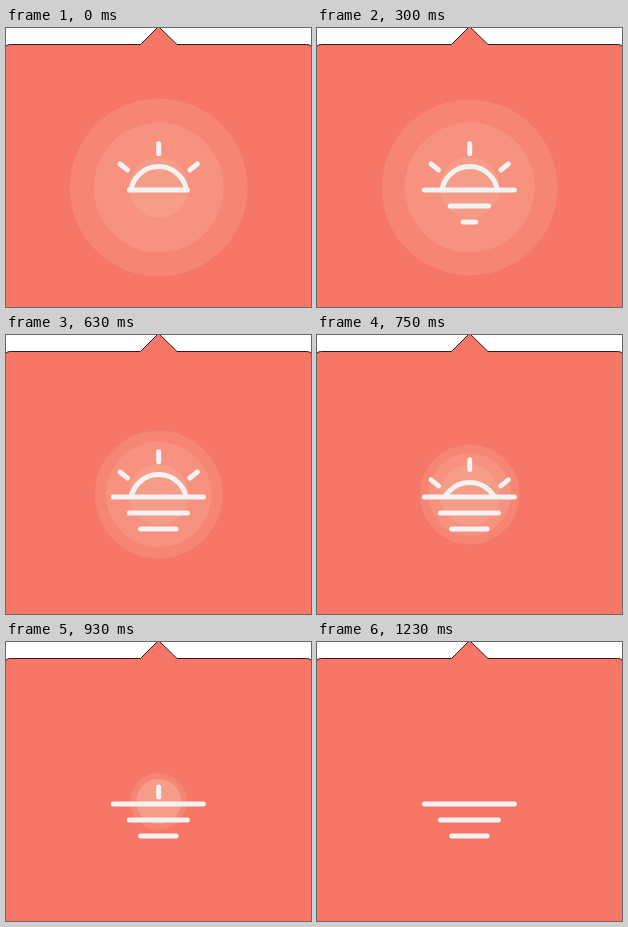
An HTML page that plays this animation: 305x279 px, repeating every 1440 ms.

```html
<!DOCTYPE html>
<html lang="en">
<head>
<meta charset="utf-8">
<title>Sunset</title>
<style>
  html, body { margin: 0; width: 100%; height: 100%; overflow: hidden; background: #fff; }
  svg { display: block; width: 305px; height: 279px; }
  .glow { fill: #f3ebcd; fill-opacity: .12; }
  .ink { fill: none; stroke: #f2f2f2; stroke-width: 5; stroke-linecap: round; }
</style>
</head>
<body>
<svg viewBox="0 0 305 279">
  <defs>
    <clipPath id="sky"><path d="M0 0H305V162H0Z"/></clipPath>
  </defs>
  <path fill="#f67668" stroke="#2a1c1a" d="M-1.5 290V22.5Q-1.5 16.5 4.5 16.5H134.5L152.5 -1.5L171 16.5H300.5Q306.5 16.5 306.5 22.5V290Z"/>
  <g class="glow">
    <circle cx="152.7" cy="159.5"/>
    <circle cx="152.7" cy="159.5"/>
    <circle cx="152.7" cy="159.5"/>
  </g>
  <g clip-path="url(#sky)">
    <g id="sun" class="ink">
      <path d="M124.7 166.5A28 28 0 0 1 180.7 166.5"/>
      <path d="M152.7 115.8V125.7M114 136L121.6 142M191.4 136L183.8 142"/>
    </g>
  </g>
  <g class="ink">
    <path class="wave"/>
    <path class="wave"/>
    <path class="wave"/>
  </g>
</svg>
<script>
const LOOP = 1440, LAST = 1230, CX = 152.4;

// radius, shrink start, shrink end
const glows = [[89, 222, 1370], [65, 360, 1310], [30, 780, 1240]];
// y, half width from, half width to, grow start, grow end
const waves = [[162, 29, 45, 0, 300], [178, 0, 29, 90, 440], [194, 0, 17.7, 140, 535]];

const sun = document.getElementById('sun');
const circles = document.querySelectorAll('circle');
const lines = document.querySelectorAll('.wave');

function ease(t, start, end) {
  const p = Math.min(1, Math.max(0, (t - start) / (end - start)));
  return (1 - Math.cos(Math.PI * p)) / 2;
}

function draw(t) {
  glows.forEach(([r, start, end], i) => {
    const left = t < LAST ? 1 - ease(t, start, end) : 0;
    circles[i].setAttribute('r', r * left);
  });
  waves.forEach(([y, from, to, start, end], i) => {
    const half = from + (to - from) * ease(t, start, end);
    lines[i].setAttribute('d', `M${CX - half} ${y}H${CX + half}`);
    lines[i].style.display = half > 0 ? '' : 'none';
  });
  sun.setAttribute('transform', `translate(0 ${51 * ease(t, 570, LAST)})`);
}

const begin = performance.now();
function tick() {
  draw((performance.now() - begin) % LOOP);
  requestAnimationFrame(tick);
}
draw(0);
requestAnimationFrame(tick);
</script>
</body>
</html>
```
